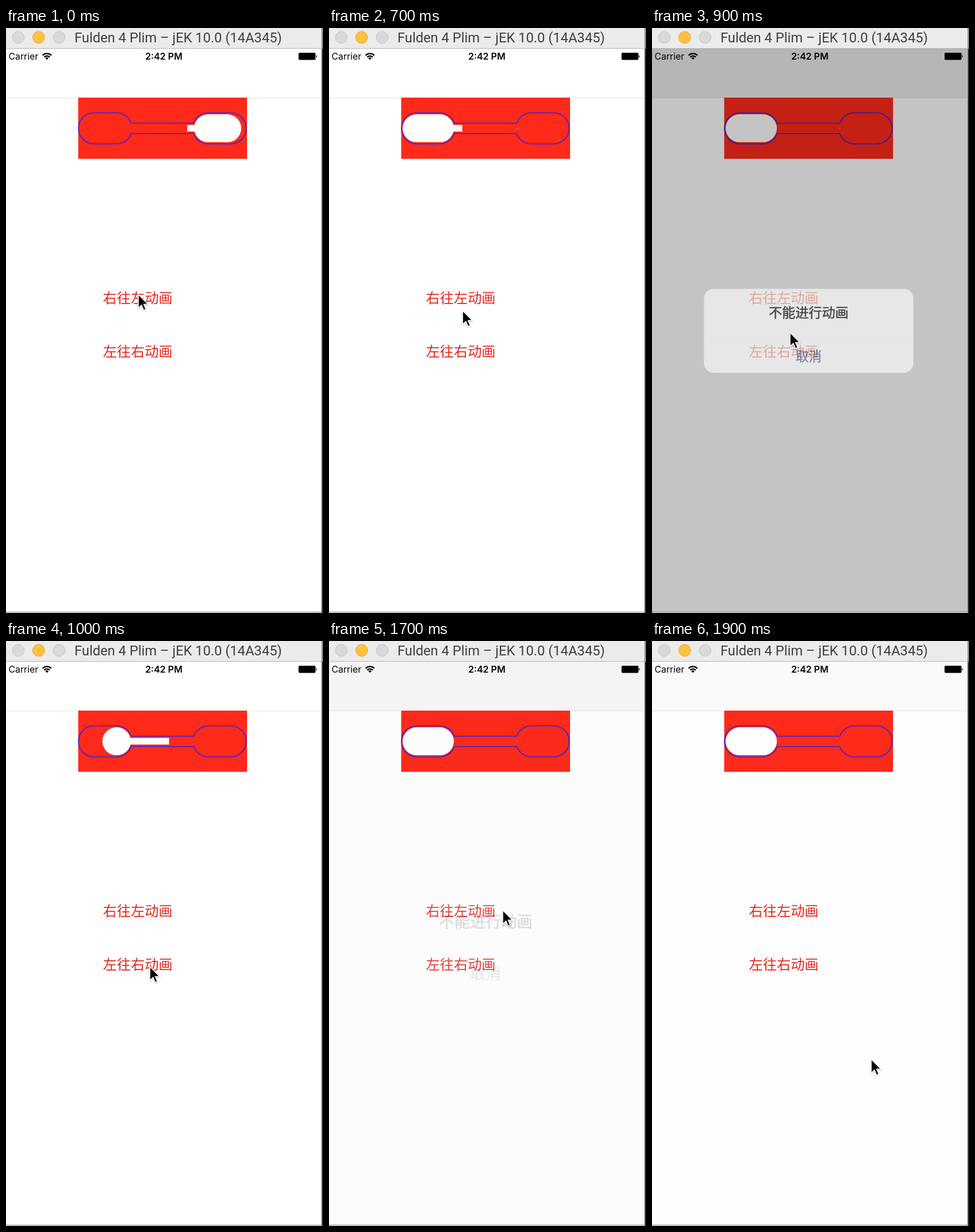
Recreate the animation shown at these times as an HTML page. Size 551 px wide and 1017 px high, loop 2 s.

```html
<!DOCTYPE html>
<html lang="zh-CN">
<head>
<meta charset="utf-8">
<title>Pill animation</title>
<style>
  html, body { margin: 0; width: 100%; height: 100%; overflow: hidden; background: #fff; }
  svg { display: block; }
  .ui { font-family: Inter, "Open Sans", sans-serif; font-size: 15.8px; }
  .title { font: 23.7px Roboto, sans-serif; fill: #3f3f3f; }
  .zh { font-family: "Noto Sans CJK SC", "Noto Sans CJK", sans-serif; }
  .button { font-size: 24.2px; fill: #e2281c; }
  .mid { text-anchor: middle; }
  .medium { stroke-width: .5px; }
</style>
</head>
<body>
<svg width="551" height="1017" viewBox="0 0 551 1017">
  <rect width="551" height="1017" fill="#fff"/>

  <!-- demo panel and buttons -->
  <path d="M0 121.5H549" stroke="#e6e6e6"/>
  <rect x="125.5" y="121" width="293.5" height="106.5" fill="#ff2a1a"/>
  <path d="M217.6 165.5H326.4A27 27 0 0 1 352 147.5H390.5A27 27 0 0 1 390.5 201.5H352A27 27 0 0 1 326.4 183.5H217.6A27 27 0 0 1 192 201.5H153A27 27 0 0 1 153 147.5H192A27 27 0 0 1 217.6 165.5Z" fill="none" stroke="#3322e4" stroke-width="1.6"/>
  <g fill="#fff">
    <g id="blob">
      <rect id="from"/>
      <rect id="bar" y="168.5" height="11.5"/>
      <rect id="to"/>
    </g>
    <circle cx="326.5" cy="174.3" r=".7"/>
  </g>
  <g class="zh button">
    <text x="168.6" y="478">右往左动画</text>
    <text x="168.6" y="571.3">左往右动画</text>
  </g>

  <!-- status bar -->
  <g class="ui">
    <text x="4.5" y="55">Carrier</text>
    <text class="mid" x="274.3" y="55" font-weight="600" font-size="16">2:42 PM</text>
  </g>
  <path d="M63.6 47.6A10.8 10.8 0 0 1 78.8 47.6M66.4 50.6A6.8 6.8 0 0 1 76 50.6" fill="none" stroke="#000" stroke-width="2.3"/>
  <path d="M71.2 55.2L68.4 52.4A4 4 0 0 1 74 52.4Z"/>
  <rect x="508.5" y="43" width="29.5" height="12.5" rx="2"/>
  <path d="M539 47a2.6 2.6 0 0 1 0 4.6z"/>

  <rect id="navDim" y="36" width="549" height="85"/>
  <rect id="dim" y="121" width="549" height="894"/>

  <g id="alert">
    <rect x="90.3" y="453.5" width="364" height="146" rx="17" fill="#fff" fill-opacity=".94"/>
    <path d="M90.3 541.5H454.3" stroke="#000" stroke-opacity=".025"/>
    <g class="zh mid medium">
      <text x="272.3" y="502.5" font-size="23.1" stroke="#000">不能进行动画</text>
      <text x="272.3" y="578.6" font-size="22.6" fill="#5a7096" stroke="#5a7096">取消</text>
    </g>
  </g>

  <!-- window frame -->
  <rect width="549" height="35" fill="#ebebeb"/>
  <path d="M0 35.5H549" stroke="#b4b4b4"/>
  <g fill="#d9d9d9" stroke="#c2c2c2">
    <circle cx="21.3" cy="16.3" r="10.3"/>
    <circle cx="92.3" cy="16.3" r="10.3"/>
    <circle cx="56.8" cy="16.3" r="10.5" fill="#fdc041" stroke="#e5ac3a"/>
  </g>
  <text class="title" x="119" y="25">Fulden 4 Plim – jEK 10.0 (14A345)</text>
  <path d="M0 1015.5H549" stroke="#707070"/>
  <rect x="548" width="1" height="1017" fill="#b5b5b5"/>
  <rect x="549" width="2" height="1017" fill="#33363a"/>
  <rect x="549" width="2" height="36" fill="#8c8c8c"/>

  <path id="cursor" d="M0 0V24L5.6 18.8 9.3 27.6 13.2 26 9.5 17.2H17Z" stroke="#fff" stroke-width="1.5" style="filter:drop-shadow(0 1px 1px rgba(0,0,0,.3))"/>
</svg>
<script>
const LOOP = 2000, STEP = 100;
const PILL = 89, LEFT = 217, RIGHT = 327, LEAD = 1.36, TRIP = 225;
const ALERT_LIFE = 212;

// trips alternate in direction, the first one runs right to left
const trips = [-9, 262, 490, 950, 1175];
const alerts = [720, 1690];

// time, tip x, tip y
const pointer = [
  [0, 230, 463], [250, 246, 562], [400, 239, 486], [800, 230, 493],
  [1000, 250, 566], [1400, 246, 470], [1700, 302, 468], [1900, 381, 727]
];

const clamp = v => Math.min(1, Math.max(0, v));
const mix = (a, b, k) => a + (b - a) * k;
const set = (id, attrs) => {
  const el = document.getElementById(id);
  for (const k in attrs) el.setAttribute(k, attrs[k]);
};

function pill(id, x, w) {
  const h = Math.min(48.5, w);
  set(id, { x, y: 174.3 - h / 2, width: w, height: h, rx: h / 2 });
}

// the near pill drains into the bar, then the bar drains into the far pill
function drawBlob(t) {
  const n = trips.findLastIndex(start => start <= t);
  const p = clamp((t - trips[n]) / TRIP);
  const drain = clamp(2 * p), fill = clamp(2 * p - 1);
  const rest = PILL * (1 - drain);
  const head = mix(LEFT, RIGHT, clamp(LEAD * drain)) + (fill > 0 && fill < 1 ? 3 : 0);
  const tail = mix(LEFT, RIGHT, fill) - Math.min(3, rest / 2);
  pill('from', LEFT - rest, rest);
  pill('to', RIGHT, PILL * clamp(LEAD * fill));
  set('bar', { x: tail, width: Math.max(0, head - tail) });
  set('blob', { transform: n % 2 ? '' : `translate(${LEFT + RIGHT}) scale(-1 1)` });
}

// the alert shrinks into place, then fades out without scaling
function drawAlert(t) {
  const age = t - (alerts.findLast(start => start <= t) ?? Infinity);
  const show = clamp(age / 80), hide = clamp((ALERT_LIFE - age) / 40);
  const shade = Math.min(show, hide);
  set('navDim', { opacity: .36 * shade });
  set('dim', { opacity: .33 * shade ** 1.6 });
  set('alert', {
    opacity: show * hide ** 2,
    transform: `translate(272.3 526) scale(${1.2 - .2 * show}) translate(-272.3 -526)`
  });
}

function drawCursor(t) {
  const n = pointer.findLastIndex(key => key[0] <= t);
  const a = pointer[n], b = pointer[n + 1] || a;
  const k = clamp((t - a[0]) / (b[0] - a[0] || 1));
  set('cursor', { transform: `translate(${mix(a[1], b[1], k)} ${mix(a[2], b[2], k)})` });
}

function tick() {
  const t = Math.floor(performance.now() % LOOP / STEP) * STEP;
  drawBlob(t);
  drawAlert(t);
  drawCursor(t);
  requestAnimationFrame(tick);
}
tick();
</script>
</body>
</html>
```
